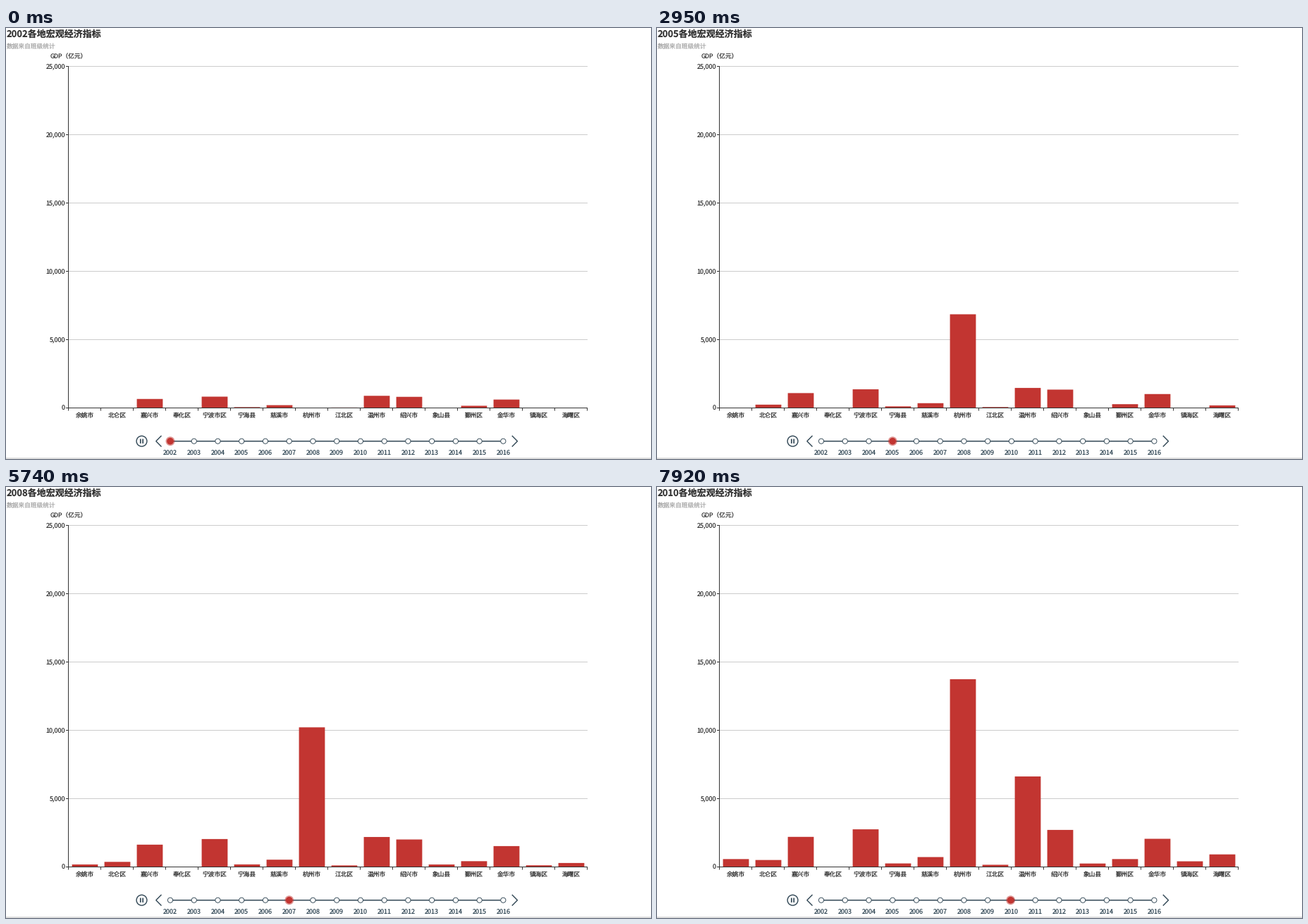
These frames come from a looping animation (915 px wide and 612 px high, 8 s). A matplotlib script:

```python
import matplotlib.pyplot as plt
from matplotlib.animation import FuncAnimation
from matplotlib.patches import Circle, Rectangle

W, H, DPI = 915, 612, 64
PT = 72 / DPI                      # points per pixel
STEP, FRAMES = 40, 200
plt.rcParams["font.family"] = ["Noto Sans CJK JP"]
plt.rcParams["text.hinting"] = "none"

RED, DARK, SLATE = "#c23531", "#333333", "#304654"
LEFT, RIGHT, TOP, BASE = 89, 825, 54.5, 539.5
BAND = (RIGHT - LEFT) / 16
PX = 97 / 5000                     # pixels per unit of GDP
FIRST_YEAR = 2002
FIRST_SWITCH, PERIOD = 690, 1010
DURATION, TICK, LEAD = 300, 80, 50
GROWTH, BOOM = 1.177, 2.23

# region: GDP in 2008 and the first year with data
REGIONS = {
    "余姚市": (490, 2008), "北仑区": (435, 2003), "嘉兴市": (1815, 2002),
    "奉化区": (0, 2002), "宁波市区": (2265, 2002), "宁海县": (230, 2002),
    "慈溪市": (610, 2002), "杭州市": (11220, 2003), "江北区": (150, 2002),
    "温州市": (2430, 2002), "绍兴市": (2230, 2002), "象山县": (225, 2007),
    "鄞州区": (490, 2002), "金华市": (1700, 2002), "镇海区": (160, 2006),
    "海曙区": (345, 2004),
}
BOOMING = {"温州市", "镇海区", "海曙区"}   # leap ahead in 2009

fig = plt.figure(figsize=(W / DPI, H / DPI), dpi=DPI, facecolor="white")
ax = fig.add_axes([0, 0, 1, 1])
ax.set_xlim(0, W)
ax.set_ylim(H, 0)
ax.axis("off")


def gdp(name, year):
    base, first = REGIONS[name]
    if year < first:
        return 0
    years = year - 2008
    if years > 0:
        years -= 0.72              # 2009 was a slow year
    boom = BOOM if name in BOOMING and year > 2008 else 1
    return base * GROWTH ** years * boom


def label(x, y, text, size=8.7, color=DARK, ha="center", **kw):
    return ax.text(x, y + 0.36 * size, text, fontsize=size * PT, color=color,
                   ha=ha, va="baseline", zorder=6, **kw)


def line(xs, ys, color=DARK, width=1, z=4):
    ax.plot(xs, ys, color=color, lw=width * PT, zorder=z, snap=False,
            solid_capstyle="butt", solid_joinstyle="miter")


def year_x(year):
    return 233 + (year - FIRST_YEAR) * 33.74


def cubic_out(k):
    return 1 - (1 - k) ** 3


def quintic_in_out(k):
    return 16 * k ** 5 if k < 0.5 else 1 - 16 * (1 - k) ** 5


# headings
title = label(0.8, 8.3, "", 13, ha="left", weight="bold")
label(0.8, 26, "数据来自班级统计", color="#aaaaaa", ha="left")
label(88.5, 40.3, "GDP（亿元）")

# value axis
for value in range(0, 25001, 5000):
    y = BASE - value * PX
    if value:
        line([LEFT, RIGHT], [y, y], "#cccccc", z=1)
    line([85, 89], [y, y])
    label(84, y + 0.5, f"{value:,}", 9, ha="right")
line([88.5, 88.5], [TOP, BASE])

# category axis and bars
line([LEFT - 1, RIGHT], [BASE, BASE])
for n in range(17):
    x = LEFT - 0.5 + n * BAND
    line([x, x], [BASE, BASE + 4])
bars = {}
for n, name in enumerate(REGIONS):
    label(LEFT + (n + 0.5) * BAND, 550, name)
    bars[name] = ax.add_patch(
        Rectangle((LEFT + (n + 0.1) * BAND, BASE + 0.5), 0.8 * BAND, 0,
                  fc=RED, lw=0, zorder=2, snap=False))

# timeline
CY = 586.7
line([year_x(2002), year_x(2016)], [CY, CY], SLATE, 1.5)
for year in range(2002, 2017):
    ax.add_patch(Circle((year_x(year), CY), 3.6, fc="white", ec=SLATE,
                        lw=0.9 * PT, zorder=5))
    label(year_x(year), 603.2, str(year), 9, SLATE)
ax.add_patch(Circle((192.5, CY), 7.4, fc="none", ec=SLATE, lw=1.4 * PT))
for x in (190.8, 194.2):
    line([x, x], [CY - 3.2, CY + 3.2], SLATE, 1.7)
for x, tip in ((220.5, 212.8), (717.8, 725.5)):
    line([x, tip, x], [CY - 7.8, CY, CY + 7.8], SLATE, 1.4)
halo = ax.add_patch(Circle((0, CY), 6.5, fc=RED, alpha=0.5, lw=0, zorder=7))
dot = ax.add_patch(Circle((0, CY), 4.8, fc=RED, lw=0, zorder=8))

line([0, W], [611, 611], "#dddddd", 2)


def progress(t):
    """Current year and the share of the switch to it that is done."""
    if t < FIRST_SWITCH:
        return FIRST_YEAR, 1.0
    n, since = divmod(t - FIRST_SWITCH, PERIOD)
    elapsed = LEAD + since // TICK * TICK
    return FIRST_YEAR + n + 1, min(1.0, elapsed / DURATION)


def draw(frame):
    year, k = progress(frame * STEP + STEP - 1)
    title.set_text(f"{year}各地宏观经济指标")
    p = cubic_out(k)
    for name, bar in bars.items():
        value = (1 - p) * gdp(name, year - 1) + p * gdp(name, year)
        bar.set_height(-value * PX)
    x = year_x(year - 1 + quintic_in_out(k))
    halo.center = dot.center = (x, CY)
    return [title, halo, dot, *bars.values()]


anim = FuncAnimation(fig, draw, frames=FRAMES, interval=STEP,
                     repeat=True, repeat_delay=0, blit=False)
plt.show()
```
